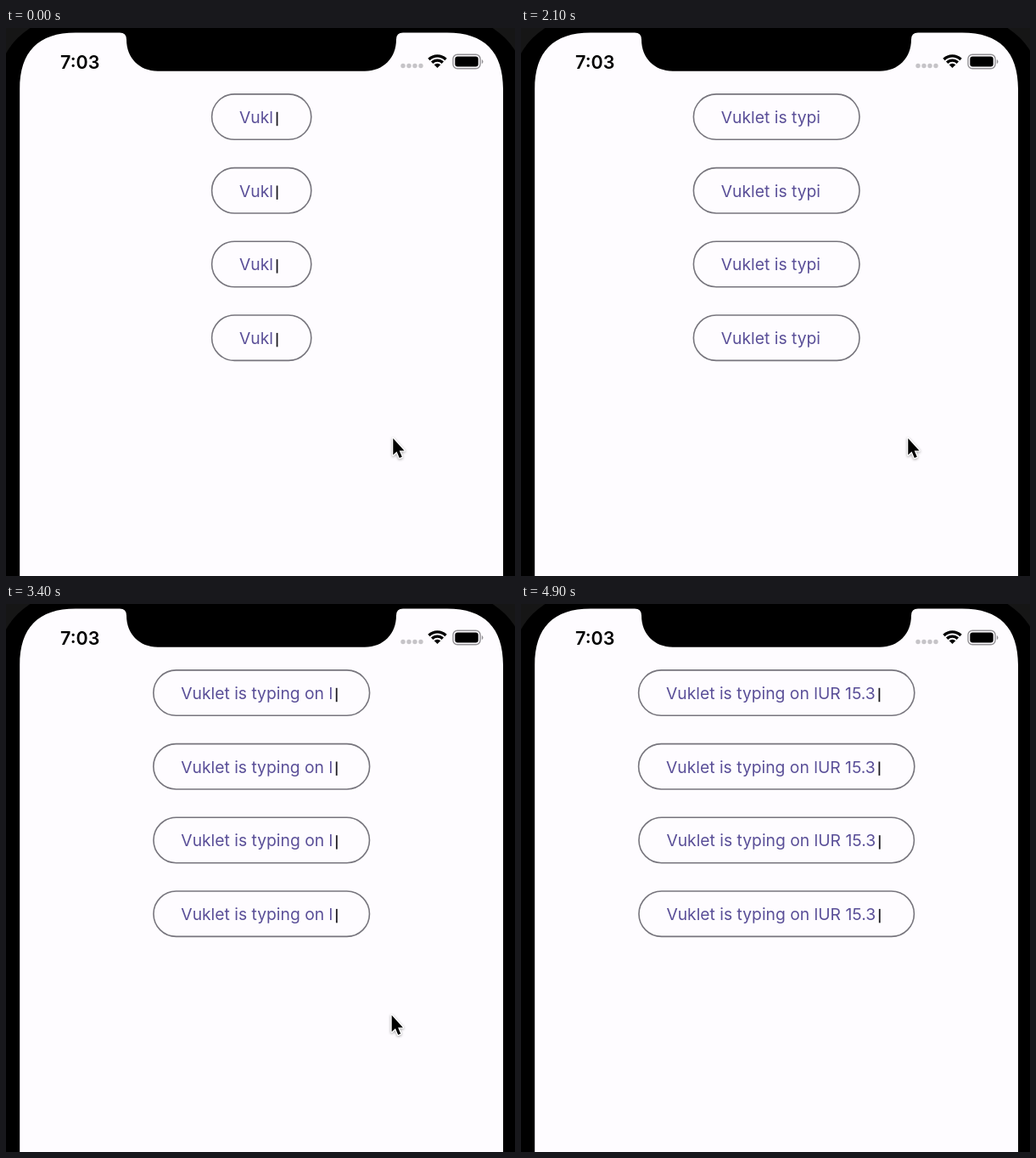
An HTML page for the animation above (5 s loop, 600 by 645 pixels).

```html
<!DOCTYPE html>
<html lang="en">
<head>
<meta charset="utf-8">
<title>Typing buttons</title>
<style>
  html, body { margin: 0; width: 100%; height: 100%; overflow: hidden; background: #000; }
  svg { display: block; width: 600px; height: 645px; }
  text { font-family: Inter, "Liberation Sans", sans-serif; }
  .clock { font-size: 21.5px; font-weight: 600; }
  .label { font-size: 19.3px; fill: #5a4f98; }
  .pill { fill: none; stroke: #77757d; stroke-width: 1.6; }
  .caret { stroke: #1c1b1f; stroke-width: 1.8; }
  .arc { fill: none; stroke: #000; stroke-width: 3.4; }
  #pointer { filter: drop-shadow(0 1px 1.5px rgba(0, 0, 0, .35)); }
</style>
</head>
<body>
<svg viewBox="0 0 600 645">
  <rect width="600" height="645" fill="#161616"/>
  <rect x="-10" y="-12" width="622" height="760" rx="81"/>
  <path fill="#fefcff" d="M16.200 645V72C16.200 28 38 5.500 82 5.500H134Q142 5.500 142 13.500
    C142 35 157 50.700 179 50.700H423C445 50.700 460 35 460 13.500Q460 5.500 468 5.500H520
    C564 5.500 586 28 586 72V645Z"/>

  <text class="clock" x="64" y="47.500">7:03</text>
  <g fill="#c6c4c8">
    <circle cx="468" cy="44.500" r="2.700"/><circle cx="475" cy="44.500" r="2.700"/>
    <circle cx="482" cy="44.500" r="2.700"/><circle cx="489" cy="44.500" r="2.700"/>
  </g>
  <path class="arc" d="M498.500 37A14.200 14.200 0 0 1 518.500 37M502.200 40.700A8.900 8.900 0 0 1 514.800 40.700"/>
  <path d="M508.500 47L504.700 43.200A5.400 5.400 0 0 1 512.300 43.200Z"/>
  <rect x="527" y="31.300" width="32" height="16.400" rx="5" fill="none" stroke="#929094" stroke-width="1.400"/>
  <rect x="529.300" y="33.500" width="27.400" height="12" rx="3"/>
  <path fill="#929094" d="M560.800 36.700Q564.200 39.500 560.800 42.300Z"/>

  <g id="rows"></g>
  <path id="pointer" d="M0 0V19.500L4.300 15.500L7.500 23L10.500 21.700L7.400 14.400H13.200Z"
    stroke="#fff" stroke-width="2.600" stroke-linejoin="round" paint-order="stroke"/>
</svg>
<script>
const MESSAGE = 'Vuklet is typing on lUR 15.3';
const LOOP = 5000, STEP = 100;
const KEY_TIME = 202.5, KEY_START = 495, KEY_INDEX = 7, GROW_TIME = 150;
const CENTER = 301.2, PAD_LEFT = 33.2, PAD_TOTAL = 80;

const add = (parent, tag, attrs) => {
  const el = document.createElementNS('http://www.w3.org/2000/svg', tag);
  set(el, attrs);
  return parent.appendChild(el);
};
function set(el, attrs) {
  for (const key in attrs) el.setAttribute(key, attrs[key]);
}

const ruler = document.createElement('canvas').getContext('2d');
ruler.font = '19.3px Inter, "Liberation Sans", sans-serif';
const widthOf = n => ruler.measureText(MESSAGE.slice(0, n)).width;

const rowsGroup = document.getElementById('rows');
const pointer = document.getElementById('pointer');
const rows = [0, 1, 2, 3].map(i => {
  const g = add(rowsGroup, 'g', { transform: `translate(0 ${104.6 + i * 86.7})` });
  return {
    pill: add(g, 'rect', { class: 'pill', y: -26.7, height: 53.4, rx: 26.7 }),
    label: add(g, 'text', { class: 'label', y: 7.4 }),
    caret: add(g, 'line', { class: 'caret', y1: -5.8, y2: 10.6 })
  };
});

function drawRow(row, i, t) {
  const keys = (t - KEY_START) / KEY_TIME;
  const count = KEY_INDEX + Math.floor(keys);
  // The lower two buttons slowly fall behind.
  const lag = i > 1 ? t / 400 : 0;
  const age = Math.max(0, (keys - Math.floor(keys)) * KEY_TIME - lag);
  const before = widthOf(count - 1), after = widthOf(count);
  const width = PAD_TOTAL + before + (after - before) * Math.min(1, age / GROW_TIME);
  const left = CENTER - width / 2;
  const textX = left + PAD_LEFT;
  const caretX = textX + after + 4.6;
  set(row.pill, { x: left + .8, width: width - 1.6 });
  set(row.label, { x: textX });
  row.label.textContent = MESSAGE.slice(0, count);
  set(row.caret, { x1: caretX, x2: caretX, visibility: t % 800 < 400 ? 'visible' : 'hidden' });
}

function drawPointer(t) {
  const nudge = t >= 2900 ? 1 : 0;
  const leave = Math.max(0, Math.min(1, (t - 3700) / 200)) ** 1.6;
  const x = 456.3 - nudge * 1.6 + leave * 69;
  const y = 483 + nudge + leave * 74;
  set(pointer, { transform: `translate(${x} ${y})`, visibility: t < 4000 ? 'visible' : 'hidden' });
}

function frame(now) {
  const t = Math.floor(now % LOOP / STEP) * STEP;
  rows.forEach((row, i) => drawRow(row, i, t));
  drawPointer(t);
  requestAnimationFrame(frame);
}
requestAnimationFrame(frame);
</script>
</body>
</html>
```
